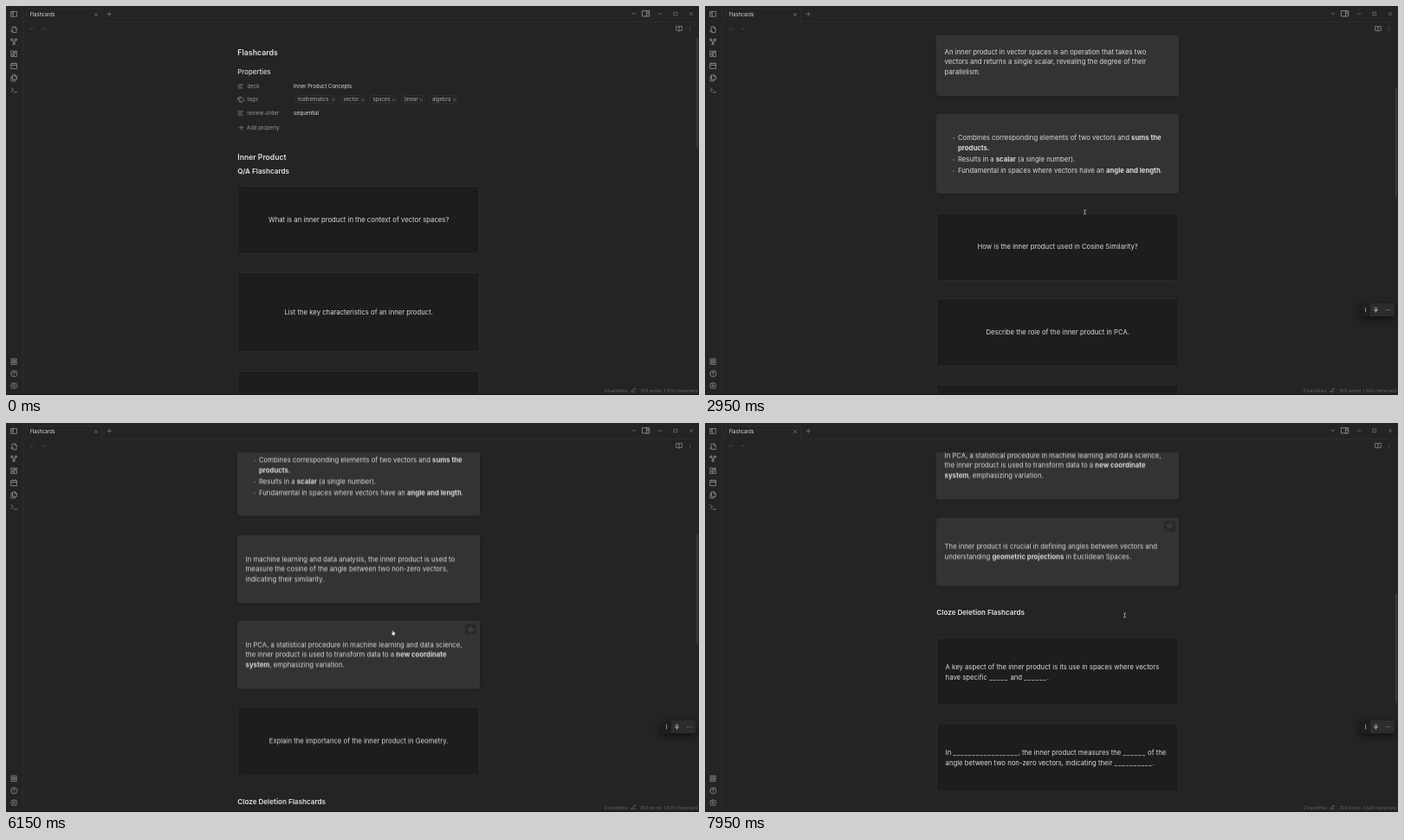
Recreate the animation shown at these times as an HTML page. Size 800 by 450 pixels, loop 8 s.

```html
<!DOCTYPE html>
<html lang="en">
<head>
<meta charset="utf-8">
<title>Flashcards</title>
<style>
@property --s { syntax: "<number>"; inherits: true; initial-value: 0; }
html, body { margin: 0; width: 100%; height: 100%; overflow: hidden; background: #242424; }
#stage { position: relative; width: 800px; height: 450px; overflow: hidden; background: #242424;
  color: #dadada; font: 400 6px/12px Inter, sans-serif; animation: scroll 8s infinite; }
#stage div, #stage svg, #stage span { position: absolute; box-sizing: border-box; }
span { white-space: nowrap; }
svg { fill: none; stroke: currentColor; stroke-width: 1.9; stroke-linecap: round; stroke-linejoin: round; overflow: visible; }
b { font-weight: 650; }
.blank { font-style: normal; letter-spacing: .9px; }
.line { background: #2c2c2c; }
#view { left: 0; top: 34px; width: 800px; height: 415px; overflow: hidden; }
#page { left: 0; top: -34px; width: 800px; height: 1000px; transform: translateY(calc(var(--s) * -1px)); }
#thumb { left: 796.5px; top: 36.5px; width: 2.5px; height: 127px; border-radius: 2px; background: #3a3a3a;
  transform: translateY(calc(var(--s) * .313px)); }
.pill { height: 10px; border: .6px solid #303030; border-radius: 5px; }
.card, .flip, .face { left: 0; top: 0; width: 280.4px; height: 100%; }
.card { left: 267px; }
.flip { transform-style: preserve-3d; animation: 8s infinite; }
.face { display: flex; align-items: center; padding: 1.8px 9.6px 0; border-radius: 3.5px; backface-visibility: hidden;
  font-size: 7.72px; line-height: 11.8px; white-space: nowrap; }
.front { background: #1d1d1d; border: .7px solid #2b2b2b; }
.ask { justify-content: center; }
.back { background: #333; box-shadow: 0 1px 3px #0003; transform: rotateY(180deg); }
ul { margin: 1px 0 0; padding: 0 0 0 15.4px; list-style: none; }
li { position: relative; margin-bottom: 1.2px; }
li::before { content: ""; position: absolute; left: -6.2px; top: 5px; width: 2px; height: 2px; border-radius: 50%; background: #666; }
.edit { left: 262.9px; top: 4px; width: 13.4px; height: 12.4px; border-radius: 2.5px; background: #282828; color: #777;
  opacity: 0; animation: 8s infinite; }
#voice { left: 756px; top: 344px; width: 40px; height: 15px; border-radius: 4px; color: #e6e6e6;
  background: linear-gradient(90deg, #1e1e1e 12px, #2c2c2c 12px);
  box-shadow: 0 3px 9px #0009; animation: voice 8s infinite step-end; }
#cursor { left: 0; top: 0; width: 0; height: 0; animation: move 8s infinite ease-in-out; }
#hand { animation: hand 8s infinite step-end; }
#beam { animation: beam 8s infinite step-end; }

@keyframes scroll {
  0%, 22.5% { --s: 0; animation-timing-function: ease-in-out; }
  26.875%, 32.5% { --s: 107; animation-timing-function: ease-out; }
  36.875%, 38% { --s: 183; animation-timing-function: linear; }
  38.75%, 58% { --s: 188.5; animation-timing-function: ease-in-out; }
  62.5%, 79.5% { --s: 292.5; animation-timing-function: ease-in-out; }
  85% { --s: 375.4; animation-timing-function: ease-out; }
  87.5%, 97.5% { --s: 390; animation-timing-function: ease-in; }
  99.375%, 100% { --s: 511.5; }
}
@keyframes flip1 { 0%, 13.9% { transform: perspective(2000px) rotateY(0deg); animation-timing-function: ease; } 21.4%, 100% { transform: perspective(2000px) rotateY(-180deg); } }
@keyframes flip2 { 0%, 28.75% { transform: perspective(2000px) rotateY(0deg); animation-timing-function: ease; } 36.25%, 100% { transform: perspective(2000px) rotateY(-180deg); } }
@keyframes flip3 { 0%, 46.25% { transform: perspective(2000px) rotateY(0deg); animation-timing-function: ease; } 53.75%, 100% { transform: perspective(2000px) rotateY(-180deg); } }
@keyframes flip4 { 0%, 68.125% { transform: perspective(2000px) rotateY(0deg); animation-timing-function: ease; } 75.625%, 100% { transform: perspective(2000px) rotateY(-180deg); } }
@keyframes flip5 { 0%, 91% { transform: perspective(2000px) rotateY(0deg); animation-timing-function: ease; } 98.5%, 100% { transform: perspective(2000px) rotateY(-180deg); } }
@keyframes edit1 { 0%, 8.5% { opacity: 0; } 10.5%, 23.5% { opacity: 1; } 25.5%, 100% { opacity: 0; } }
@keyframes edit2 { 0%, 25% { opacity: 0; } 27%, 34% { opacity: 1; } 36%, 100% { opacity: 0; } }
@keyframes edit3 { 0%, 38.75% { opacity: 0; } 40.75%, 60.8% { opacity: 1; } 62.8%, 100% { opacity: 0; } }
@keyframes edit4 { 0%, 62% { opacity: 0; } 64%, 85.5% { opacity: 1; } 87.5%, 100% { opacity: 0; } }
@keyframes edit5 { 0%, 85.6% { opacity: 0; } 87.5%, 100% { opacity: 1; } }
@keyframes voice { 0% { opacity: 0; } 12.5%, 100% { opacity: 1; } }
@keyframes move {
  0%, .6% { transform: translate(690px, 127px); }
  5.6% { transform: translate(266px, 238px); }
  10.6%, 11.8% { transform: translate(404px, 246px); }
  15% { transform: translate(409px, 233px); }
  20%, 22.5% { transform: translate(410px, 234px); }
  26.875%, 28.75% { transform: translate(425px, 236px); }
  36.875%, 38% { transform: translate(438px, 238px); }
  39.4% { transform: translate(434px, 255px); }
  41.25%, 46.8% { transform: translate(448px, 261px); }
  51% { transform: translate(452px, 240px); }
  54.4% { transform: translate(451px, 243px); }
  62.5% { transform: translate(462px, 231px); }
  68% { transform: translate(457px, 240px); }
  83%, 91.25% { transform: translate(442px, 243.5px); }
  99.375%, 100% { transform: translate(484px, 222px); }
}
@keyframes hand { 0% { opacity: 0; } 6.3% { opacity: 1; } 23.2% { opacity: 0; } 25% { opacity: 1; } 36% { opacity: 0; }
  38.75% { opacity: 1; } 82.5% { opacity: 0; } 86% { opacity: 1; } 98.6%, 100% { opacity: 0; } }
@keyframes beam { 0% { opacity: 0; } .62% { opacity: 1; } 6.3% { opacity: 0; } 23.2% { opacity: 1; } 25% { opacity: 0; } 36% { opacity: 1; }
  38.75% { opacity: 0; } 82.5% { opacity: 1; } 86% { opacity: 0; } 98.6%, 100% { opacity: 1; } }
</style>
</head>
<body>
<div id="stage">
  <div id="view"><div id="page"></div></div>
  <div id="chrome"></div>
  <div id="thumb"></div>
  <div id="voice"></div>
  <div id="cursor">
    <svg id="hand" width="5.8" height="6.6" viewBox="0 0 16 18" style="left:-2.6px;top:-2.6px;stroke:#222;stroke-width:1">
      <path fill="#fff" d="M5 10V2.5a1.5 1.5 0 0 1 3 0V7q3-.6 5 1 1.3 .6 1 2.5l-1 4.5-1 2H6L2 11.5q-.3-2 1.5-2z"/>
    </svg>
    <svg id="beam" width="5" height="7" viewBox="0 0 12 16" style="left:-2.5px;top:-3.5px;color:#b5b5b5">
      <path d="M3 2q3 0 3 2 0-2 3-2M6 4v8M3 14q3 0 3-2 0 2 3 2"/>
    </svg>
  </div>
</div>
<script>
const $ = id => document.getElementById(id);
const add = (id, html) => $(id).insertAdjacentHTML('beforeend', html);

const text = (x, y, str, size = 6, color = '#dadada', weight = 400) =>
  `<span style="left:${x}px;top:${y - 6}px;font-size:${size}px;color:${color};font-weight:${weight}">${str}</span>`;
const icon = (x, y, d, size = 8.6, color = '#a2a2a2') =>
  `<svg viewBox="0 0 24 24" width="${size}" height="${size}" style="left:${x - size / 2}px;top:${y - size / 2}px;color:${color}"><path d="${d}"/></svg>`;
const line = (x, y, w, h) => `<div class="line" style="left:${x}px;top:${y}px;width:${w}px;height:${h}px"></div>`;

const cross = 'M5 5 19 19M19 5 5 19';
const plus = 'M12 4v16M4 12h16';
const rows = 'M3 6h17M3 12h12M3 18h15';
const panel = 'M3 4h18v16H3zM9 4v16';
const dot = (x, y) => `M${x} ${y}h.1`;

// Window frame, ribbon and status bar
const ribbon = [
  [9, panel + 'M5 8h2M5 12h2'],
  [27, 'M6 12V3h9l5 5v13h-8M15 3v5h5M3 17a3 3 0 1 0 6 0 3 3 0 1 0-6 0M8 20l3 3'],
  [41, 'M3 3h5v5H3zM16 3h5v5h-5zM9.5 16h5v5h-5zM6 8q0 4 6 4t6-4M12 12v4'],
  [55, 'M3 3h7v8H3zM14 3h7v4h-7zM14 11h7v10h-7zM3 15h7v6H3z'],
  [69, 'M3 4h18v17H3zM3 10h18M8 2v4M16 2v4'],
  [83, 'M8 2h8l5 5v10H8zM15 2v6h6M8 7H3v15h12v-5'],
  [97, 'M3 5l7 6-7 6M12 19h9'],
  [411, 'M4 3h16v18H4zM8 8h8v8H8zM12 10v4'],
  [425, 'M2 12a10 10 0 1 0 20 0 10 10 0 1 0-20 0M9 9q0-3 3-3t3 3q0 2-3 4M12 17h.1'],
  [439, 'M12 2l3 3 4-1 1 4 3 4-3 4-1 4-4-1-3 3-3-3-4 1-1-4-3-4 3-4 1-4 4 1zM8.5 12a3.5 3.5 0 1 0 7 0 3.5 3.5 0 1 0-7 0']
];
add('chrome',
  line(19, 0, .7, 450) + line(19, 17.8, 4, .7) + line(111, 17.8, 689, .7) +
  '<div style="left:23px;top:2.5px;width:88px;height:16px;border:.7px solid #2c2c2c;border-bottom:0;border-radius:3px 3px 0 0"></div>' +
  '<div style="left:0;top:449px;width:800px;height:1px;background:#191919"></div>' +
  ribbon.map(([y, d]) => icon(9.5, y, d)).join('') +
  text(27.7, 9.7, 'Flashcards', 5.6) +
  icon(104, 9.7, cross, 6) + icon(119, 9, plus, 6.5) +
  icon(725, 9, 'M6 9l6 6 6-6', 7.5) + icon(739, 9, 'M2 4h20v16H2zM14 4v16M17 8h2M17 12h2', 9.5) +
  icon(754.5, 8.7, 'M4 12h16', 6) + icon(772.7, 8.5, 'M5 5h14v14H5z', 6) + icon(791, 8.5, cross, 6) +
  icon(30, 26, 'M20 12H4M10 6l-6 6 6 6', 7, '#484848') + icon(43, 26, 'M4 12h16M14 6l6 6-6 6', 7, '#484848') +
  icon(777, 26, 'M12 6q-3-2-10-2v15q7 0 10 2 3-2 10-2V4q-7 0-10 2zv15', 8) +
  icon(789, 26, dot(12, 5) + dot(12, 12) + dot(12, 19), 7) +
  text(690.8, 444.5, '0 backlinks', 5, '#666') +
  icon(724, 444.5, 'M4 20l2-6L17 3l4 4L10 18zM14 21h7', 6.5, '#8a8a8a') +
  text(732, 444.5, '359 words', 5, '#666') +
  text(759.3, 444.5, '1,829 characters', 5, '#666'));

add('voice',
  icon(6, 7.5, 'M12 4v16', 7, '#e6e6e6') +
  icon(18, 7.5, 'M9 5a3 3 0 0 1 6 0v6a3 3 0 0 1-6 0zM5 11q0 6 7 6t7-6M12 17v5', 7, '#e6e6e6') +
  icon(32, 7.5, dot(5, 12) + dot(12, 12) + dot(19, 12), 7, '#e6e6e6'));

// Note header
const muted = '#999';
const tags = [['mathematics', 336.5, 377], ['vector', 389.5, 411], ['spaces', 423.4, 447.8], ['linear', 460, 479.7], ['algebra', 492, 517.3]];
add('page',
  text(267.3, 53.7, 'Flashcards', 8.8, '#e2e2e2', 600) +
  text(267.3, 76, 'Properties', 7.8, '#dadada', 500) +
  icon(271, 93, rows, 8, muted) + text(278.6, 93, 'deck', 6, muted) + text(332, 93, 'Inner Product Concepts') +
  icon(271, 108.3, 'M7 4h6l8 8-7 8-9-9V4M2 6v6l8 9M9 8h.1', 9, muted) + text(278.6, 108.3, 'tags', 6, muted) +
  tags.map(([name, x, end]) =>
    `<div class="pill" style="left:${x - 4}px;top:103.3px;width:${end - x + 8}px"></div>` +
    text(x, 108.3, name, 6, '#a8a8a8') + icon(end, 108.3, cross, 5)).join('') +
  icon(271, 123.8, rows, 8, muted) + text(278.6, 123.8, 'review-order', 6, muted) + text(332, 123.8, 'sequential') +
  icon(272, 140.7, plus, 7.5, muted) + text(278, 140.7, 'Add property', 6, muted) +
  text(267.3, 175, 'Inner Product', 8.6, '#e2e2e2', 600) +
  text(267.3, 191.3, 'Q/A Flashcards', 8.12, '#e2e2e2', 600) +
  text(267.3, 730.3, 'Cloze Deletion Flashcards', 8.12, '#e2e2e2', 600));

// Cards: top, height, front, back
const cards = [
  [208.2, 78.6, 'What is an inner product in the context of vector spaces?',
    'An inner product in vector spaces is an operation that takes two<br>vectors and returns a single scalar, revealing the degree of their<br>parallelism.'],
  [307.9, 92.3, 'List the key characteristics of an inner product.',
    '<ul><li>Combines corresponding elements of two vectors and <b>sums the<br>products.</b></li><li>Results in a <b>scalar</b> (a single number).</li><li>Fundamental in spaces where vectors have an <b>angle and length</b>.</li></ul>'],
  [421.5, 78.6, 'How is the inner product used in Cosine Similarity?',
    'In machine learning and data analysis, the inner product is used to<br>measure the cosine of the angle between two non-zero vectors,<br>indicating their similarity.'],
  [521.1, 78.6, 'Describe the role of the inner product in PCA.',
    'In PCA, a statistical procedure in machine learning and data science,<br>the inner product is used to transform data to a <b>new coordinate<br>system</b>, emphasizing variation.'],
  [620.5, 78.6, 'Explain the importance of the inner product in Geometry.',
    'The inner product is crucial in defining angles between vectors and<br>understanding <b>geometric projections</b> in Euclidean Spaces.'],
  [759.6, 78.6, 'A key aspect of the inner product is its use in spaces where vectors<br>have specific _____ and ______.'],
  [859.1, 78.6, 'In _________________, the inner product measures the ______ of the<br>angle between two non-zero vectors, indicating their __________.']
];
const code = icon(6.7, 6.2, 'M7 6l-6 6 6 6M17 6l6 6-6 6M14 4l-4 16', 7, '#777');
const face = (kind, html) => `<div class="face ${kind}"><div style="position:static">${html}</div></div>`;
const blanks = str => str.replace(/_+/g, '<i class="blank">$&</i>');
cards.forEach(([top, height, front, back], i) => {
  const n = i + 1;
  const body = back
    ? `<div class="flip" style="animation-name:flip${n}">${face('front ask', front)}${face('back', back)}</div>
       <div class="edit" style="animation-name:edit${n}">${code}</div>`
    : face('front', blanks(front));
  add('page', `<div class="card" style="top:${top}px;height:${height}px">${body}</div>`);
});
</script>
</body>
</html>
```
